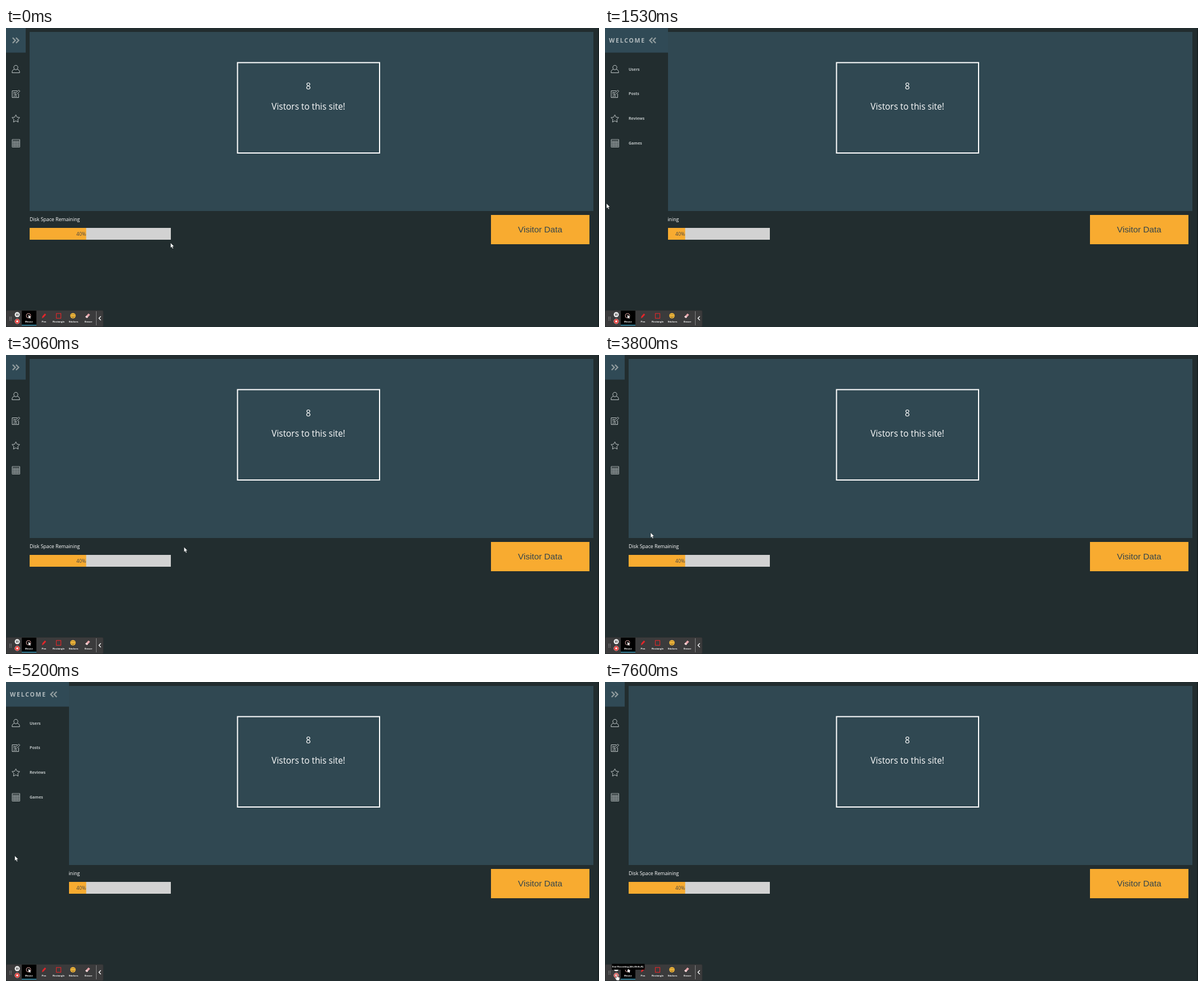
An HTML page for the animation above (7660 ms loop, 1054x531 px).

```html
<!DOCTYPE html>
<html lang="en">
<head>
<meta charset="utf-8">
<title>Dashboard</title>
<style>
html, body { margin: 0; width: 100%; height: 100%; overflow: hidden; background: #222d2f; }
svg { display: block; }
text { font-family: "Open Sans", sans-serif; fill: #fff; }
.bold { font-weight: 700; fill: #bcc2c3; font-size: 7px; }
.icon { fill: none; stroke: #bfc6c7; stroke-width: 1; stroke-linejoin: round; }
.tool text { font: 700 4.4px "Liberation Sans", Arial, sans-serif; text-anchor: middle; }
</style>
</head>
<body>
<svg width="1054" height="531" viewBox="0 0 1054 531">
  <rect width="1054" height="531" fill="#222d2f"/>
  <rect x="1052.5" width="1.5" height="531" fill="#141c1e"/>

  <!-- Main panel -->
  <rect x="42" y="7" width="1002" height="318" fill="#304852"/>
  <rect x="411.5" y="61.5" width="252.5" height="160.5" fill="none" stroke="#fff" stroke-width="2"/>
  <g font-size="15.4" text-anchor="middle">
    <text x="537.5" y="109.3">8</text>
    <text x="537.5" y="145.3">Vistors to this site!</text>
  </g>

  <!-- Disk space and button -->
  <text x="42" y="343.4" font-size="8.75">Disk Space Remaining</text>
  <rect x="42" y="355" width="251" height="21" fill="#d2d2d2"/>
  <rect x="42" y="355" width="100.5" height="21" fill="#f8ab30"/>
  <text x="125" y="368.7" font-size="8.75" style="fill:#4b4a45">40%</text>
  <rect x="862" y="332" width="175" height="52" fill="#f8ab30"/>
  <text x="949.5" y="363.2" font-size="15.3" text-anchor="middle"
    style="font-family:'Liberation Sans',Arial,sans-serif;fill:#34454c">Visitor Data</text>

  <!-- Sidebar -->
  <rect id="side" width="35" height="531" fill="#222d2f"/>
  <rect id="head" width="35" height="43.7" fill="#304a56"/>
  <text id="welcome" class="bold" x="7" y="26" style="font-size:10.5px;letter-spacing:1.8px;fill:#b2bbbe">WELCOME</text>
  <path id="arrows" d="M-5.7-4.8L-1-0L-5.7 4.8M.3-4.8L5 0L.3 4.8" fill="none" stroke="#929d9f" stroke-width="2.2"/>
  <g class="icon">
    <path d="M17.5 66.3c5 0 4.6 7.8 0 7.8s-5-7.8 0-7.8zM14.8 73.2c-3 1-4 2.500-4 6.300h13.400c0-3.800-1-5.300-4-6.300"/>
    <path d="M20 111.500H11v12h11.500v-7M16 119l.7-2.800 6-6 2 2-6 6zM13 114.500h4M13 117h2.500M13 121h7"/>
    <path id="star"/>
    <path id="grid"/>
  </g>
  <g id="labels" class="bold">
    <text class="bold" x="42" y="75.5">Users</text>
    <text class="bold" x="42" y="119.4">Posts</text>
    <text class="bold" x="42" y="163.300">Reviews</text>
    <text class="bold" x="42" y="207.1">Games</text>
  </g>

  <!-- Recording toolbar -->
  <g class="tool">
    <rect x=".5" y="501.5" width="172.500" height="29" rx="2" fill="#3b3b3c" stroke="#2b2f30"/>
    <path d="M6.700 513v7M9.300 513v7" stroke="#aaa" stroke-width="1.1" stroke-dasharray="1.200 1.500"/>
    <circle cx="20" cy="509" r="4.500" fill="#f2f2f2"/>
    <path d="M18.700 507v4M21.300 507v4" stroke="#333" stroke-width="1.2"/>
    <circle id="stop" cx="20" cy="521" r="4.300" fill="#e5322f" stroke="#e8caca" stroke-width=".6"/>
    <rect x="18.400" y="519.400" width="3.200" height="3.200" fill="#fff"/>
    <rect x="28" y="502" width="26" height="26" fill="#000"/>
    <rect x="28" y="527" width="26" height="1.300" fill="#2f9fc4"/>
    <circle cx="40" cy="511" r="4" fill="none" stroke="#d9a5a3" stroke-width="1"/>
    <path d="M40 509.500v6l1.500-1.300 1.300 2.200 1-.6-1.200-2.100 2-.3z" fill="#fff"/>
    <path d="M63.800 515.500l1-3.700 4.300-4.800 2.200 2-4.400 4.900z" fill="#e3262b"/>
    <rect x="89.500" y="507" width="8" height="8.500" fill="none" stroke="#d8282b" stroke-width="1.200"/>
    <circle cx="119" cy="511" r="4.800" fill="#f3b93c"/>
    <path d="M116.300 512q2.700 3.600 5.400 0" fill="none" stroke="#5b3b16" stroke-width=".9"/>
    <path d="M117.300 508.500v1.500M120.700 508.500v1.500" stroke="#5b3b16"/>
    <path d="M141 513l5.500-6 3 2.300-5.500 6z" fill="#e9a5ab"/>
    <path d="M141 513l1.800-2 3 2.300-1.800 2z" fill="#f5dcdd"/>
    <text x="41" y="522.700">Mouse</text>
    <text x="67.500" y="522.700">Pen</text>
    <text x="93.600" y="522.700">Rectangle</text>
    <text x="120" y="522.700">Stickers</text>
    <text x="146.500" y="522.700">Eraser</text>
    <path d="M160.500 503v25" stroke="#8b8b8b" stroke-width=".9"/>
    <path d="M168.500 512l-3.300 3.500 3.300 3.500" fill="none" stroke="#fff" stroke-width="1.300"/>
    <g id="tip">
      <rect x="12" y="500.500" width="58.500" height="10.500" rx="1" fill="#000"/>
      <text x="40.500" y="507.300" style="font-size:4.1px">End Recording (Alt+Shift+R)</text>
      <path d="M41 509.500v5.500l1.400-1.200 1.200 2 .9-.5-1.100-2 1.800-.3z" fill="#fff"/>
    </g>
  </g>

  <!-- Pointer -->
  <path id="arrow" d="M0 0v9l2-1.800 1.500 3.300 1.600-.7-1.500-3.200 2.800-.2z" fill="#fff" stroke="#10181a" stroke-width=".5"/>
  <path id="hand" d="M-.8 0q.8-1 1.600 0v3.500l3.500 1q1 .5.700 1.800l-.7 3.700h-4.500l-3-4q0-1.200 1.300-.8l1.100 1z" fill="#fff" stroke="#222" stroke-width=".4"/>
</svg>
<script>
const $ = id => document.getElementById(id);
const set = (id, attrs) => {
  for (const k in attrs) $(id).setAttribute(k, attrs[k]);
};
const show = (id, on) => set(id, { visibility: on ? "visible" : "hidden" });

const LOOP = 7660, SPEED = 600, STOP = 7530;
const HOVERS = [[440, 2130], [3900, 5800]]; // sidebar enter and leave times
const POINTER = [ // time, x, y
  [0, 292.5, 381.5], [60, 288, 380], [200, 190, 360], [350, 82, 334], [440, 32, 320],
  [600, 2.5, 311.5], [1530, 2.5, 311.5], [1850, 28, 314], [2130, 113, 322],
  [2350, 235, 335], [2600, 316.5, 341], [3060, 316.5, 341], [3400, 265, 336],
  [3700, 130, 320], [3900, 33, 311], [4150, 12.5, 308.5], [4200, 12.5, 308.5],
  [4530, 15.5, 308.5], [5200, 15.5, 308.5], [5500, 40, 311], [5800, 113, 319],
  [6200, 191.5, 328], [6500, 235, 350], [6800, 220, 410], [7100, 145, 500],
  [7350, 50, 518], [STOP, 21, 520], [LOOP, 21, 520]
];

const star = Array.from({ length: 10 }, (_, i) => {
  const a = i * Math.PI / 5, r = i % 2 ? 3.6 : 7.2;
  return [17.5 + r * Math.sin(a), 161.3 - r * Math.cos(a)];
});
set("star", { d: `M${star.join("L")}Z` });

let grid = "M11 198h13.500v13.500h-13.500zM11 201h13.500";
for (let i = 1; i < 4; i++) grid += `M${11 + i * 3.375} 201v10.500M11 ${201 + i * 2.6}h13.500`;
set("grid", { d: grid, "stroke-width": .85 });

// CSS "ease": cubic-bezier(.25, .1, .25, 1)
function ease(x) {
  if (x <= 0) return 0;
  if (x >= 1) return 1;
  const bezier = (u, a, b) => 3 * u * (1 - u) ** 2 * a + 3 * u * u * (1 - u) * b + u ** 3;
  let lo = 0, hi = 1;
  for (let i = 0; i < 24; i++) {
    const mid = (lo + hi) / 2;
    if (bezier(mid, .25, .25) < x) lo = mid; else hi = mid;
  }
  return bezier(lo, .1, 1);
}

function pointerAt(t) {
  const i = POINTER.findIndex(k => k[0] > t);
  const [t0, x0, y0] = POINTER[i - 1], [t1, x1, y1] = POINTER[i];
  const k = (t - t0) / (t1 - t0);
  return [x0 + (x1 - x0) * k, y0 + (y1 - y0) * k];
}

function draw() {
  const t = performance.now() % LOOP;
  const open = HOVERS.reduce((sum, [enter, leave]) =>
    sum + ease((t - enter) / SPEED) - ease((t - leave) / SPEED), 0);
  const width = 35 + 77 * open;
  set("side", { width });
  set("head", { width });
  set("welcome", { x: 7 - 437 * (1 - open) });
  set("arrows", { transform: `translate(${17.5 + 67 * open} 22) rotate(${-180 * open})` });
  show("labels", HOVERS.some(([enter, leave]) => t >= enter && t < leave));

  const stopping = t >= STOP;
  const transform = `translate(${pointerAt(t)})`;
  set("arrow", { transform });
  set("hand", { transform });
  show("arrow", !stopping);
  show("hand", stopping);
  show("tip", stopping);
  set("stop", { fill: stopping ? "#e4605e" : "#e5322f" });
  requestAnimationFrame(draw);
}
draw();
</script>
</body>
</html>
```
